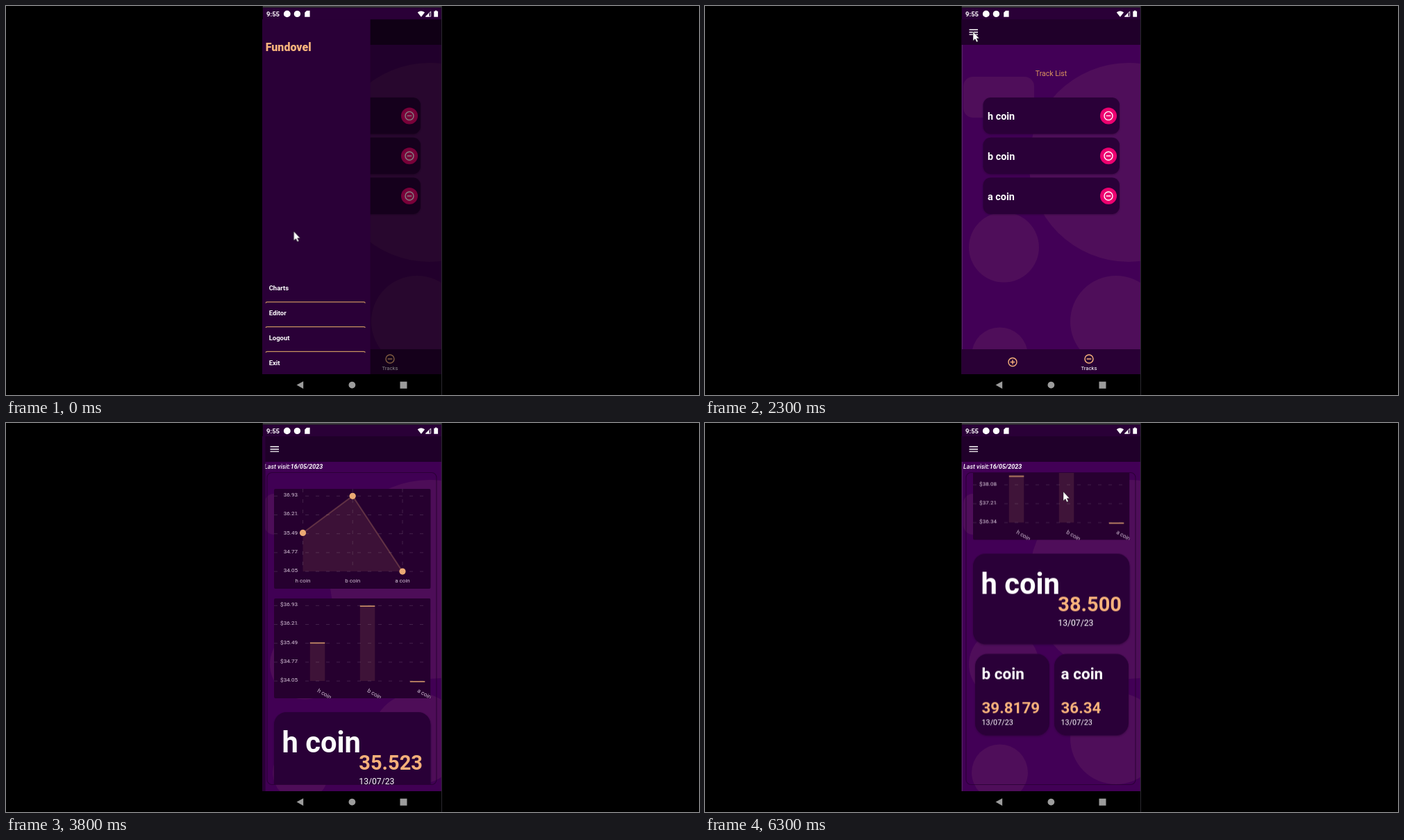
Animation, 998 px wide and 561 px high, one loop 6400 ms. Source, as an HTML page:

```html
<!DOCTYPE html>
<html lang="en">
<head>
<meta charset="utf-8">
<title>Coin tracker</title>
<style>
  html, body { margin: 0; width: 100%; height: 100%; overflow: hidden; background: #000; }
  svg { display: block; width: 100vw; height: 100vh; font-family: Roboto, sans-serif; }
  .b { font-weight: 700; }
  .mid { text-anchor: middle; }
  .end { text-anchor: end; }
  .peach { fill: #f8b37c; }
  .card { fill: #2a0037; }
  .blob { fill: #4f0e5a; }

  .drawer, .dim, .tracks, .charts, .old, .new, .scroll, .press, .cursor, .pointer {
    animation: 6.4s linear infinite;
  }
  .drawer { animation-name: drawer; animation-timing-function: cubic-bezier(.16, 1, .3, 1); }
  .dim { animation-name: dim; animation-timing-function: cubic-bezier(.16, 1, .3, 1); }
  .tracks, .charts, .old, .new, .press, .pointer { animation-timing-function: step-end; }
  .tracks { animation-name: tracks; }
  .charts { animation-name: charts; }
  .old { animation-name: old; }
  .new { animation-name: new; }
  .press { animation-name: press; }
  .pointer { animation-name: pointer; }
  .scroll { animation-name: scroll; }
  .cursor { animation-name: cursor; animation-timing-function: ease-in-out; }

  @keyframes drawer {
    0% { transform: translateX(-2.7px); }
    5%, 14.8% { transform: none; }
    27.3%, 36.7% { transform: translateX(-158px); }
    49.2%, 53% { transform: none; }
    65.5%, 100% { transform: translateX(-158px); }
  }
  @keyframes dim {
    0% { opacity: .49; }
    5%, 14.8% { opacity: .5; }
    27.3%, 36.7% { opacity: 0; }
    49.2%, 53% { opacity: .5; }
    65.5%, 100% { opacity: 0; }
  }
  @keyframes tracks { 0% { visibility: visible; } 53%, 100% { visibility: hidden; } }
  @keyframes charts { 0% { visibility: hidden; } 53%, 100% { visibility: visible; } }
  @keyframes old { 0% { opacity: 1; } 68%, 100% { opacity: 0; } }
  @keyframes new { 0% { opacity: 0; } 68%, 100% { opacity: 1; } }
  @keyframes press { 0% { opacity: 0; } 13.2% { opacity: 1; } 17%, 100% { opacity: 0; } }
  @keyframes pointer { 0% { opacity: 1; } 57.8% { opacity: 0; } 67%, 100% { opacity: 1; } }
  @keyframes scroll {
    0%, 69.5% { transform: none; }
    79.7% { transform: translateY(-214px); }
    82%, 100% { transform: translateY(-228.5px); }
  }
  @keyframes cursor {
    0%, 2% { transform: translate(414.5px, 325px); }
    13%, 20% { transform: translate(419px, 435px); }
    34%, 38% { transform: translate(386px, 37px); }
    47%, 60% { transform: translate(412px, 399px); }
    60.01%, 69.5% { transform: translate(516px, 354px); animation-timing-function: linear; }
    79.7% { transform: translate(516px, 140px); animation-timing-function: linear; }
    82% { transform: translate(516px, 125.5px); animation-timing-function: linear; }
    86%, 100% { transform: translate(516px, 99px); }
  }
</style>
</head>
<body>
<svg id="stage" viewBox="0 0 998 561" preserveAspectRatio="none"></svg>
<script>
  const text = (x, y, size, str, cls = '', fill = '#fff', more = '') =>
    `<text x="${x}" y="${y}" font-size="${size}" class="${cls}" ${cls.includes('peach') ? '' : `fill="${fill}"`} ${more}>${str}</text>`;
  const rect = (x, y, w, h, fill, r = 0, more = '') =>
    `<rect x="${x}" y="${y}" width="${w}" height="${h}" rx="${r}" fill="${fill}" ${more}/>`;
  const circle = (x, y, r, more) => `<circle cx="${x}" cy="${y}" r="${r}" ${more}/>`;
  const line = (d, stroke, w, more = '') =>
    `<path d="${d}" fill="none" stroke="${stroke}" stroke-width="${w}" ${more}/>`;
  const ring = (x, y, color, plus) =>
    circle(x, y, 6, `fill="none" stroke="${color}" stroke-width="1.4"`) +
    line(`M${x - 3.3} ${y}h6.6` + (plus ? `M${x} ${y - 3.3}v6.6` : ''), color, 1.4);

  const names = ['h coin', 'b coin', 'a coin'];
  const menu = line('M380.5 34.3h12.5m-12.5 3.4h12.5m-12.5 3.4h12.5', '#fff', 1.4);
  const header = rect(369.5, 19, 258, 37, '#20002a') + menu;

  const backdrop = rect(369.5, 56, 258, 475, '#420056') +
    '<g class="blob"><rect x="372" y="102" width="102" height="59" rx="14"/>' +
    circle(610, 225.5, 143.5, '') + circle(430.5, 348, 50.5, '') +
    circle(592, 455, 66, '') + circle(424.5, 504, 40.5, '') + '</g>';
  const edge = rect(369.5, 56, 1, 475, '#fff', 0, 'opacity=".25"');

  const trackRow = (name, i) => {
    const y = 132 + i * 57.8;
    return rect(400.5, y, 196.5, 52.4, '#2a0037', 11, 'filter="url(#soft)"') +
      text(407, y + 32, 14.4, name, 'b') +
      circle(581, y + 26.4, 12, 'fill="#ec0070"') + ring(581, y + 26.4, '#fff');
  };
  const tracks = `<g class="tracks">${backdrop}${header}${edge}
    ${text(498.5, 100.5, 10.5, 'Track List', 'mid', '#dc965f')}
    ${names.map(trackRow).join('')}
    ${rect(369.5, 495, 258, 36, '#290035')}
    ${ring(443, 513.5, '#f8b37c', true)}${ring(553, 509, '#f8b37c')}
    ${text(553, 525, 7.8, 'Tracks', 'mid')}</g>`;

  const grid = (y, lo, hi, sign) => [0, 1, 2, 3, 4].map(i => {
    const gy = y + i * 27.2;
    return line(`M386 ${gy}H611`, '#fff', .8, 'stroke-dasharray="5 10" opacity=".17"') +
      text(420, gy + .8, 8.1, sign + (hi - (hi - lo) * i / 4).toFixed(2), 'end', '#d8c6da');
  }).join('');

  // Both charts and all price cards for one set of prices
  const board = (cls, prices) => {
    const vals = prices.map(Number), lo = Math.min(...vals), hi = Math.max(...vals);
    const drop = v => 108.8 * (hi - v) / (hi - lo);
    const xs = [427.5, 499.2, 571];
    const pts = vals.map((v, i) => `${xs[i]} ${105.3 + drop(v)}`);
    const date = '13/07/23';
    const cols = vals.map((v, i) => {
      const x = 437.8 + i * 72, y = 263.3 + drop(v);
      return rect(x, y, 21.5, 372 - y, '#f8b37c', 0, 'opacity=".11"') +
        rect(x, y, 21.5, 1.7, '#c98f68') +
        text(0, 0, 8.1, names[i], '', '#d8c6da', `transform="translate(${x + 10} 387.5) rotate(30)"`);
    }).join('');
    const small = i => {
      const x = 389 + (i - 1) * 114;
      return rect(x, 561.5, 107, 117.5, '#2a0037', 18, 'filter="url(#soft)"') +
        text(x + 9.5, 598, 22.5, names[i], 'b') +
        text(x + 9.5, 646.5, 22.4, prices[i], 'b peach') +
        text(x + 9.5, 664, 10.8, date);
    };
    return `<g class="${cls}">
      ${rect(386, 95, 225.5, 144, '#270030', 2)}
      ${grid(105.3, lo, hi, '')}
      ${line(xs.map(x => `M${x} 95V214`).join(''), '#fff', .8, 'stroke-dasharray="5 10" opacity=".17"')}
      <path d="M${pts.join('L')}V214.1H427.5Z" fill="#f8b37c" opacity=".1"/>
      ${line('M' + pts.join('L'), '#f8b37c', 2, 'opacity=".24"')}
      ${vals.map((v, i) => circle(xs[i], 105.3 + drop(v), 4.6, 'fill="#efac76"') +
        text(xs[i], 229.8, 8.1, names[i], 'mid', '#d8c6da')).join('')}
      <g clip-path="url(#bars)">${rect(386, 253, 225.5, 144, '#270030', 2)}
      ${grid(263.3, lo, hi, '$')}${cols}</g>
      ${rect(386, 417, 225.5, 130.5, '#2a0037', 18, 'filter="url(#soft)"')}
      ${text(397.5, 475, 41.7, names[0], 'b')}
      ${text(508.3, 500, 29, prices[0], 'b peach')}
      ${text(508.3, 520.7, 12.2, date)}
      ${small(1)}${small(2)}</g>`;
  };

  const charts = `<g class="charts">${backdrop}${header}${edge}
    ${rect(376, 71.5, 244, 450, 'none', 7, 'stroke="#24002e" stroke-width="1.2" opacity=".75"')}
    <text x="372" y="66" font-size="9" font-style="italic" font-weight="500" fill="#fff">Last visit:<tspan class="b">16/05/2023</tspan></text>
    <g clip-path="url(#view)"><g class="scroll">
      ${board('old', ['35.523', '36.93', '34.05'])}
      ${board('new', ['38.500', '39.8179', '36.34'])}
    </g></g></g>`;

  const items = ['Charts', 'Editor', 'Logout', 'Exit'].map((s, i) => {
    const y = 410.4 + i * 35.7;
    return text(381.3, y, 9.5, s, 'b') + (i < 3 ?
      line(`M376.8 ${y + 18}q0-1.5 2-1.5H517.8q2 0 2 1.5`, '#c7935f', 1.3) : '');
  }).join('');
  const drawer = `<g class="drawer">
    ${rect(369.5, 19, 158, 512, '#2a0037')}
    ${rect(428, 431, 44, 22, '#000', 2, 'class="press" fill-opacity=".14"')}
    ${text(376.4, 65.3, 16, 'Fundovel', 'peach', '', 'font-weight="900"')}
    ${items}</g>`;

  const status = rect(369.5, 0, 258, 2.5, '#3b3b3d') + rect(369.5, 2.5, 258, 16.8, '#2a0037') +
    text(375, 15, 9.5, '9:55', 'b') +
    circle(404.8, 11.4, 4.9, 'fill="#fff"') + circle(419.4, 11.4, 4.7, 'fill="#fff"') +
    `<path fill="#fff" d="M433 6.8h4.6v9h-7.4V9.6zM592.7 9.3q5-4 10.4 0l-5.2 6.4z
      M616.3 7.6h1.8v-1h2.2v1h1.8v8.2h-5.8z"/>
    <path fill="#fff" d="M604 15.4l5.5-5.5v5.5z"/>` +
    line('M604.5 15.1l7.2-7.2v7.2z', '#fff', .9);

  const navBar = rect(369.5, 531, 258, 30, '#000') +
    '<path fill="#9c9c9c" d="M418.6 546.6l9.6-5.4v10.8z"/>' +
    circle(498.4, 546.6, 4.9, 'fill="#9c9c9c"') + rect(567.5, 541.7, 10, 10, '#9c9c9c');

  document.getElementById('stage').innerHTML = `<defs>
      <filter id="soft" x="-10%" y="-10%" width="120%" height="125%">
        <feDropShadow dx="0" dy="1" stdDeviation="1.2" flood-color="#1c0026" flood-opacity=".5"/>
      </filter>
      <clipPath id="phone"><rect x="369.5" width="258" height="561"/></clipPath>
      <clipPath id="view"><rect x="376" y="72" width="244" height="449"/></clipPath>
      <clipPath id="bars"><rect x="386" y="253" width="225.5" height="144"/></clipPath>
    </defs>
    <rect width="998" height="561"/>
    <g clip-path="url(#phone)">${tracks}${charts}
      ${rect(369.5, 19, 258, 512, '#000', 0, 'class="dim"')}
      ${drawer}${status}${navBar}</g>
    ${rect(627, 0, 1, 561, '#2b2930')}
    <g class="pointer"><g class="cursor">
      <path d="M0 0V13.2L3 10.5L5.1 15L7.2 14L5.2 9.7H9Z" fill="#fff" stroke="#222" stroke-width=".5"/>
    </g></g>`;
</script>
</body>
</html>
```
